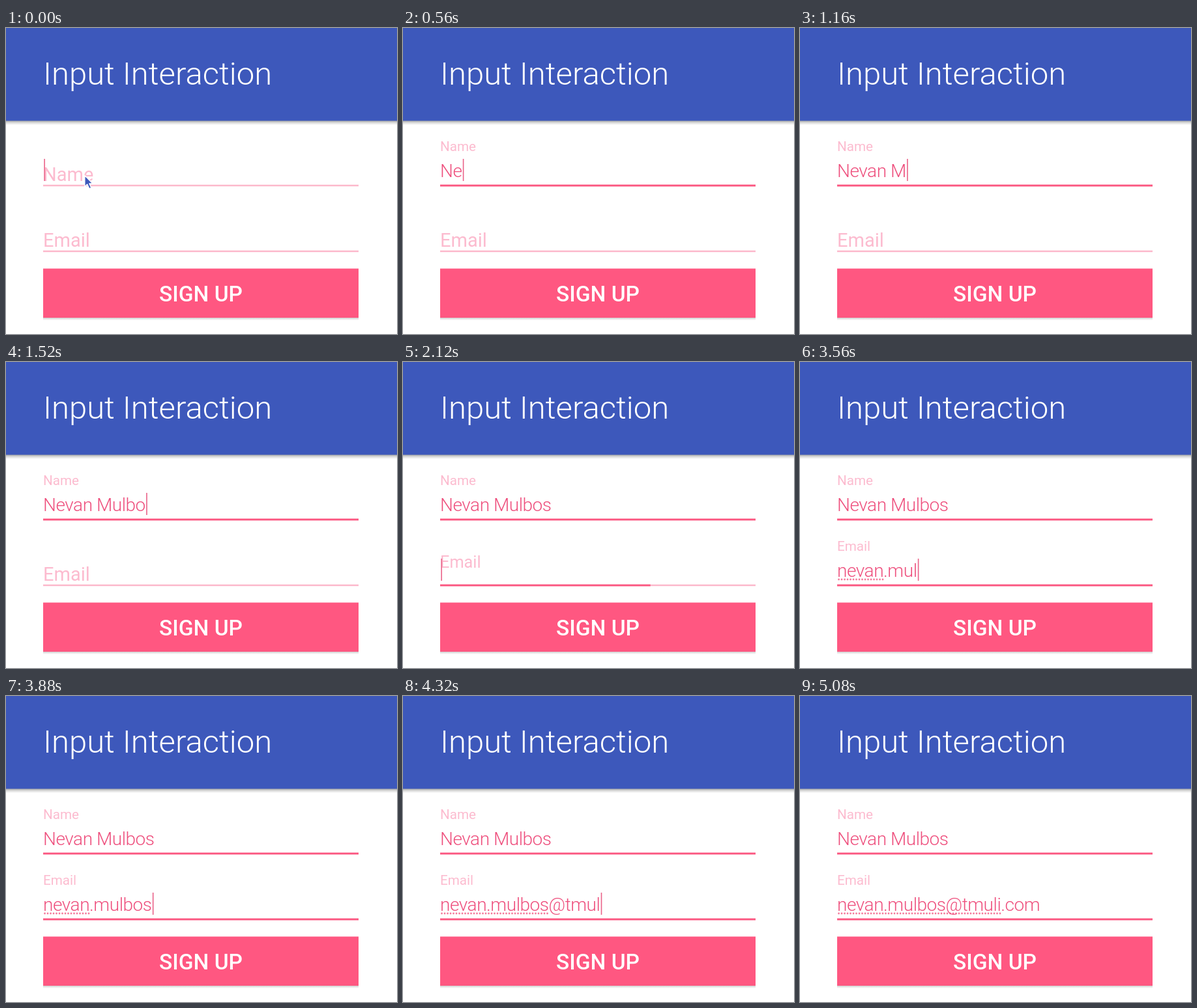
An HTML page that plays this animation: 600x470 px, repeating every 5.16 s.

```html
<!DOCTYPE html>
<html lang="en">
<head>
<meta charset="utf-8">
<title>Input Interaction</title>
<style>
  html, body { margin: 0; width: 100%; height: 100%; overflow: hidden; background: #fff; }
  svg { display: block; width: 600px; height: 470px; font-family: Roboto, sans-serif; }
  .title { font-size: 49px; font-weight: 300; fill: #fff; }
  .button { font-size: 33.5px; font-weight: 500; fill: #fff; text-anchor: middle; }
  .label { font-size: 29px; fill: #fcbbcf; }
  .value { font-size: 28px; font-weight: 300; letter-spacing: -.45px; fill: #ee4f7d; white-space: pre; }
  .track { fill: #fcb8cb; }
  .bar { fill: #fb5680; }
  .caret { fill: #ea6288; }
  .spell { stroke: #f4799b; stroke-width: 2.8; stroke-linecap: round; stroke-dasharray: 0 4.5; }
</style>
</head>
<body>
<svg viewBox="0 0 600 470">
  <defs>
    <linearGradient id="shade" x2="0" y2="1">
      <stop offset="0" stop-color="#000" stop-opacity=".38"/>
      <stop offset=".45" stop-color="#000" stop-opacity=".16"/>
      <stop offset="1" stop-color="#000" stop-opacity="0"/>
    </linearGradient>
  </defs>
  <rect width="600" height="470" fill="#fff"/>
  <rect y="142" width="600" height="7" fill="url(#shade)"/>
  <rect width="600" height="142.5" fill="#3d58bb"/>
  <text class="title" x="57" y="87">Input Interaction</text>
  <g id="fields"></g>
  <rect x="57" y="444" width="484" height="5" fill="url(#shade)" opacity=".75"/>
  <rect x="57" y="369.5" width="484" height="75.5" fill="#ff5781"/>
  <text class="button" x="299" y="420">SIGN UP</text>
  <path id="pointer" d="M120.8 226.5v17.2l3.9-3.6 3 6.8 3.2-1.4-3-6.6h5.2z"
        fill="#3d58bb" stroke="#fff" stroke-width="1.4" stroke-linejoin="round"/>
</svg>
<script>
const LOOP = 5160, STEP = 40, LEFT = 57, WIDTH = 484, GROW = 240;
const layer = document.getElementById('fields');
const pointer = document.getElementById('pointer');

function add(parent, tag, attrs, text = '') {
  const node = document.createElementNS('http://www.w3.org/2000/svg', tag);
  for (const key in attrs) node.setAttribute(key, attrs[key]);
  node.textContent = text;
  return parent.appendChild(node);
}

// keys: the time at which each character appears; marks: [time, underlined length]
function makeField({ y, label, value, focus, blur, caretOn, keys, marks = [] }) {
  const group = add(layer, 'g', { transform: `translate(${LEFT} ${y})` });
  add(group, 'rect', { class: 'track', y: -1.3, width: WIDTH, height: 2.5 });
  const bar = add(group, 'rect', { class: 'bar', y: -1.4, height: 2.8 });
  const name = add(group, 'text', { class: 'label' }, label);
  const spell = add(group, 'line', { class: 'spell', x1: 2.5, y1: -9, y2: -9 });
  const typed = add(group, 'text', { class: 'value', y: -13 });
  const caret = add(group, 'rect', { class: 'caret', y: -41, width: 1.6, height: 34 });

  return time => {
    const p = Math.min(1, Math.max(0, (time - focus) / GROW));
    const lift = p * p;
    bar.setAttribute('width', WIDTH * p);
    name.setAttribute('transform', `translate(0 ${-7 - 46 * lift}) scale(${1 - 0.287 * lift})`);

    const count = keys.filter(key => key <= time).length;
    typed.textContent = value.slice(0, count);
    caret.setAttribute('x', 1.3 + (count ? typed.getComputedTextLength() : 0));
    caret.style.display = time >= caretOn && time < blur ? '' : 'none';

    const marked = marks.reduce((n, [at, length]) => time >= at ? length : n, 0);
    spell.style.display = marked ? '' : 'none';
    if (marked) spell.setAttribute('x2', typed.getSubStringLength(0, marked));
  };
}

const fields = [
  makeField({
    y: 242, label: 'Name', value: 'Nevan Mulbos',
    focus: 0, caretOn: 0, blur: 1920,
    keys: [400, 560, 640, 720, 800, 880, 1160, 1240, 1320, 1400, 1520, 1640]
  }),
  makeField({
    y: 343, label: 'Email', value: 'nevan.mulbos@tmuli.com',
    focus: 1960, caretOn: 1920, blur: 5080,
    keys: [2480, 2600, 2720, 2800, 2920, 3120, 3320, 3440, 3560, 3640, 3720,
           3840, 4080, 4160, 4200, 4240, 4320, 4400, 4560, 4680, 4800, 4920],
    marks: [[3120, 5], [4080, 12], [4560, 18]]
  })
];

function draw(now) {
  const time = Math.floor(now % LOOP / STEP) * STEP;
  fields.forEach(update => update(time));
  pointer.style.display = time < 400 ? '' : 'none';
}

function tick() {
  draw(performance.now());
  requestAnimationFrame(tick);
}
draw(0);
requestAnimationFrame(tick);
</script>
</body>
</html>
```
